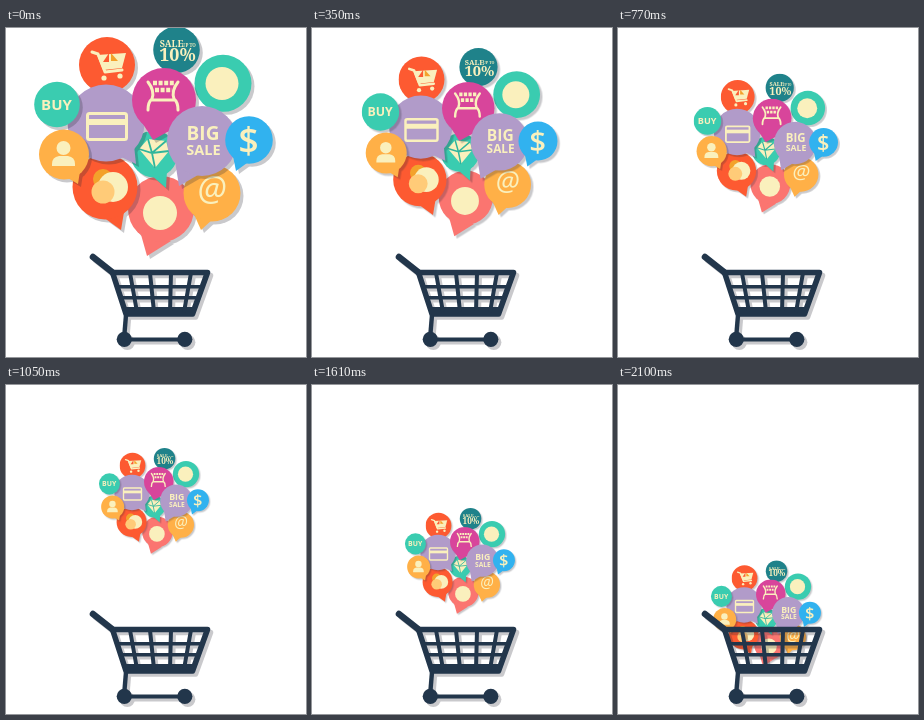
An HTML page for the animation above (2.38 s loop, 300 by 329 pixels).

```html
<!DOCTYPE html>
<html lang="en">
<head>
<meta charset="utf-8">
<title>Shopping cart</title>
<style>
  html, body { margin: 0; width: 100%; height: 100%; overflow: hidden; background: #fff; }
  svg { display: block; width: 100vw; height: 100vh; }
  text { font-family: "Open Sans", "Noto Sans", sans-serif; font-weight: 700; text-anchor: middle; fill: #faf0bd; }
  .slab { font-family: "Noto Serif", serif; }
  .cluster {
    transform-origin: 148.3px 118px;
    animation: fill-cart 2380ms -3ms infinite;
  }
  .cluster > g { filter: drop-shadow(3.5px 3.5px 0 rgba(40, 40, 50, .25)); }
  .cart {
    fill: none; stroke: #22364b; stroke-linejoin: round;
    filter: drop-shadow(3px 3.5px 0 rgba(40, 40, 50, .25));
  }
  .cream { fill: #faf0bd; }
  .line { fill: none; stroke: #faf0bd; stroke-width: 3; stroke-linejoin: round; stroke-linecap: round; }
  .red { fill: #fd5a31; }
  .green { fill: #3accb0; }
  .teal { fill: #1f828a; }
  .purple { fill: #b19bc9; }
  .magenta { fill: #d8459b; }
  .pink { fill: #fb7570; }
  .amber { fill: #ffb047; }
  .peach { fill: #ffcb78; }
  .gold { fill: #f3a22b; }
  .blue { fill: #31b2ef; }

  /* shrink in place for 1050 ms, drop for 1050 ms, then rest */
  @keyframes fill-cart {
    0% { transform: translate(0, 0) scale(1); animation-timing-function: steps(15); }
    44.1176% { transform: translate(0, 0) scale(.461); animation-timing-function: steps(15); }
    88.2353%, 100% { transform: translate(0, 112.5px) scale(.461); }
  }
</style>
</head>
<body>
<svg viewBox="0 0 300 329">
  <g class="cluster">
    <g>
      <circle class="red" cx="101" cy="37" r="28"/>
      <path class="line" stroke-width="2" d="M86 24l6 2 7 18 17-2"/>
      <path class="cream" d="M91 27l29-2-4 15-19 2z"/>
      <path class="red" d="M97 34l6-9v9z"/>
      <path class="gold" d="M105 25l7 8h-7z"/>
      <circle class="cream" cx="98" cy="50" r="2.6"/>
      <circle class="cream" cx="114" cy="48" r="2.6"/>
    </g>
    <g>
      <circle class="teal" cx="170.5" cy="21.8" r="23.3"/>
      <text class="slab" x="165.5" y="19" font-size="9">SALE</text>
      <text class="slab" x="183" y="18.5" font-size="4.5">UP TO</text>
      <text class="slab" x="171.5" y="33" font-size="18">10%</text>
    </g>
    <g>
      <circle class="green" cx="217" cy="55.3" r="28.5"/>
      <circle class="cream" cx="216" cy="55.5" r="16.5"/>
    </g>
    <g>
      <path class="pink" d="M134 203l7 25 24-15z"/>
      <circle class="pink" cx="155" cy="181" r="33"/>
      <circle class="cream" cx="154" cy="185" r="17"/>
    </g>
    <g>
      <path class="red" d="M97 189l18 13 3-18z"/>
      <circle class="red" cx="99" cy="159" r="32.5"/>
      <circle class="gold" cx="97" cy="151" r="10"/>
      <circle class="cream" cx="107" cy="159" r="15"/>
      <circle class="peach" cx="97" cy="164" r="11.5"/>
    </g>
    <g>
      <path class="amber" d="M187 184l8 18 12-11z"/>
      <circle class="amber" cx="206" cy="165" r="28.5"/>
      <text x="206" y="173" font-size="34" font-style="italic" style="font-weight:400">@</text>
    </g>
    <g>
      <path class="green" d="M144 146l16 14 1-18z"/>
      <circle class="green" cx="148" cy="126" r="23.5"/>
      <path class="cream" d="M133 121l9-10 18 2 3 10-14 17z"/>
      <path d="M133 121l13 4 17-2M142 111l4 14 14-12M146 125l3 15" fill="none" stroke="#2fb59c" stroke-width="1.8"/>
    </g>
    <g>
      <path class="purple" d="M115 129l15 7-2-19z"/>
      <circle class="purple" cx="100" cy="95" r="38.5"/>
      <rect class="line" x="81.5" y="85.5" width="39" height="26" rx="2"/>
      <path class="cream" d="M81 91h40v6h-40z"/>
    </g>
    <g>
      <path class="magenta" d="M137 96l10 16 16-9z"/>
      <circle class="magenta" cx="158" cy="72" r="32"/>
      <path class="line" stroke-width="4" d="M142 54q7 9 4 17q-4 3-4 11M172 54q-7 9-4 17q4 3 4 11M146 72h22"/>
      <path d="M147 55h21M149 62h17" fill="none" stroke="#faf0bd" stroke-width="4.5" stroke-dasharray="4 1.6"/>
    </g>
    <g>
      <path class="purple" d="M169 133l4 25 19-11z"/>
      <circle class="purple" cx="196" cy="113" r="35"/>
      <text x="197" y="112" font-size="19">BIG</text>
      <text x="197.5" y="126.5" font-size="14.5">SALE</text>
    </g>
    <g>
      <circle class="green" cx="51" cy="76.5" r="22.8"/>
      <text x="50.5" y="82" font-size="15">BUY</text>
    </g>
    <g>
      <path class="amber" d="M60 149l12 7 2-13z"/>
      <circle class="amber" cx="58" cy="126.5" r="25"/>
      <circle class="cream" cx="57.5" cy="120" r="7"/>
      <path class="cream" d="M46 138v-2q0-7 7-8h9q7 1 7 8v2z"/>
    </g>
    <g>
      <path class="blue" d="M227 128l3 15 11-8z"/>
      <circle class="blue" cx="243" cy="112" r="23.8"/>
      <text x="242.5" y="125" font-size="36" style="font-weight:600">$</text>
    </g>
  </g>

  <g class="cart">
    <path d="M87 229L106 244" stroke-width="6.5" stroke-linecap="round"/>
    <path d="M106.5 244.5H201.5L186.5 286H120Z" stroke-width="5.6"/>
    <path d="M117 282.5H189" stroke-width="7"/>
    <path d="M111 258.8H197M114 269.8H193" stroke-width="3.5"/>
    <path d="M124 245L131 284M144 245L148 284M165 245L164 284M185 245L178 284" stroke-width="4"/>
    <path d="M120 287L118 311" stroke-width="4.4"/>
    <path d="M118 311.5H179" stroke-width="4"/>
    <g fill="#22364b" stroke="none">
      <circle cx="118.3" cy="311.3" r="7.6"/>
      <circle cx="178.8" cy="311.3" r="7.6"/>
    </g>
  </g>
</svg>
</body>
</html>
```
